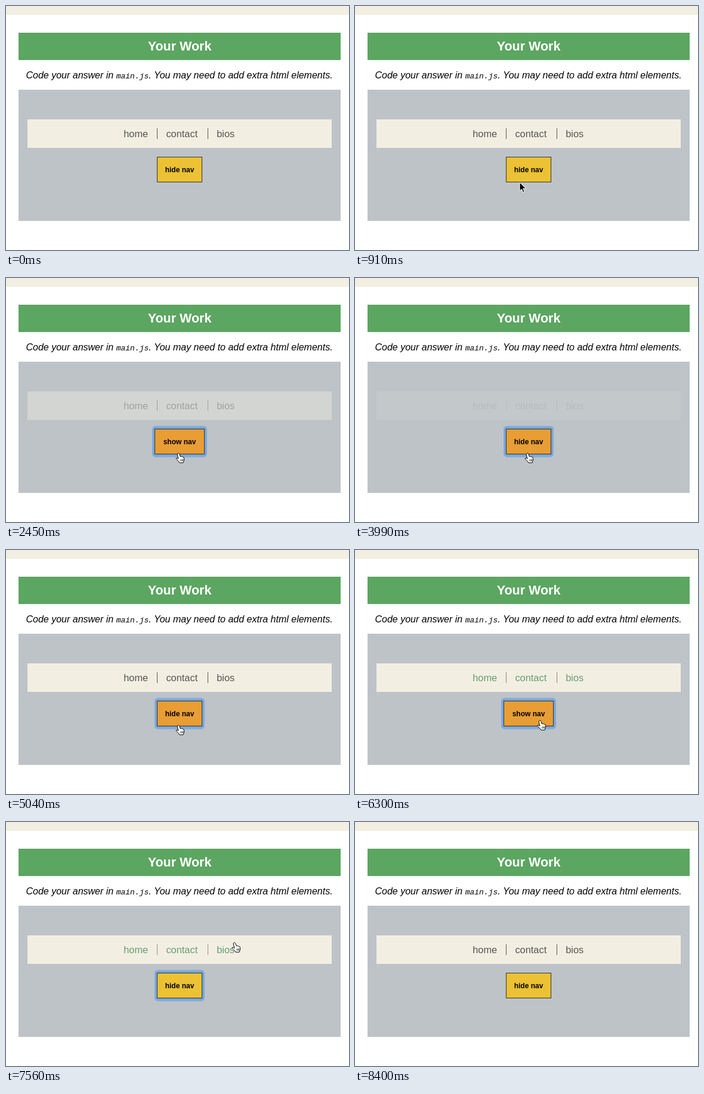
Animation, 575 px wide and 411 px high, one loop 8.47 s. Source, as an HTML page:

```html
<!DOCTYPE html>
<html lang="en">
<head>
<meta charset="utf-8">
<title>Toggle nav</title>
<style>
  html, body { margin: 0; width: 100%; height: 100%; overflow: hidden; background: #fff; }
  svg { display: block; font-family: "Liberation Sans", Arial, sans-serif; }
  .title { font-size: 21.5px; font-weight: bold; fill: #fff; }
  .task { font-size: 16px; font-style: italic; }
  .code { font-size: 13px; font-family: "Liberation Mono", monospace; }
  #links { font-size: 16.4px; }
  #label { font-size: 12px; font-weight: bold; }
</style>
</head>
<body>
<svg width="575" height="411" viewBox="0 0 575 411">
  <rect width="575" height="15" fill="#f2efe2"/>
  <rect x="21" y="45" width="540" height="46" fill="#5ba660"/>
  <text class="title" x="291" y="75" text-anchor="middle">Your Work</text>
  <text class="task" x="33.5" y="122">Code your answer in <tspan class="code">main.js</tspan>. You may need to add extra html elements.</text>
  <rect x="21" y="141" width="540" height="221" fill="#bdc3c7"/>

  <rect id="navBack" x="36" y="191" width="510" height="48" fill="#f2efe2"/>
  <g id="links">
    <text x="197.2" y="221">home</text>
    <text x="268.4" y="221">contact</text>
    <text x="353.2" y="221">bios</text>
  </g>
  <path id="dividers" d="M253.5 206v18M338.5 206v18" stroke="#555"/>

  <g id="ring" fill="none" stroke="#74a7e0">
    <rect id="glow" y="251" height="49" rx="4" stroke-width="4" opacity=".75"/>
    <rect id="halo" y="252.5" height="46" rx="2" stroke-width="3"/>
  </g>
  <rect id="button" y="254.5" height="42" stroke="#333"/>
  <text id="label" x="291" y="280" text-anchor="middle"></text>

  <g id="cursor">
    <path id="arrow" d="M0 0V14.5L3.4 11.4 5.7 16.8 8 15.9 5.8 10.6 10.5 10.4Z" stroke="#fff"/>
    <g id="hand" transform="translate(-5 -1)" fill="#fff" stroke="#000" stroke-linejoin="round">
      <path d="M3.2 3.5Q3 1.5 4.5 1.2 6.2 .8 6.8 2.6L8.3 7Q9.4 6 10.5 7 12 6.2 12.8 7.8 14.5 7.5 14.5 9.5V13L13 17.2H7Q5.5 14.5 1.5 11 .5 9.5 2 9 3.5 8.8 5 10.5Z"/>
      <path d="M8.5 11.5l.8 3.3M10.6 11.2l.5 3.3M12.5 11l.1 3.3" stroke-width=".8"/>
    </g>
  </g>
</svg>
<script>
const LOOP = 8470, STEP = 70, FADE = 1000;
const FIRST_CLICK = 1960, BLUR = 8400, CURSOR_GONE = 7910;

// [time, visible after the click]
const toggles = [[2100, 0], [3990, 1], [6090, 0], [7210, 1]];

// [time, x, y] of the cursor tip
const route = [
  [210, 308, -16], [420, 296, 140], [700, 272, 301],
  [840, 272, 301], [1050, 284, 288], [1190, 288, 295],
  [1890, 288, 295], [1960, 289, 295],
  [5530, 289, 295], [5740, 314, 277], [5880, 310, 287],
  [7280, 310, 287], [7560, 383, 203], [7700, 366, 105], [7840, 346, 14]
];

const $ = id => document.getElementById(id);
const set = (id, attrs) => {
  for (const name in attrs) $(id).setAttribute(name, attrs[name]);
};
const clamp = v => Math.max(0, Math.min(1, v));
const mix = (a, b, k) => a + (b - a) * k;
const mixColor = (a, b, k) => `rgb(${a.map((v, i) => Math.round(mix(v, b[i], k)))})`;
const inside = ([x, y], left, top, right, bottom) =>
  x >= left && x <= right && y >= top && y <= bottom;

// cubic-bezier(.25, .1, .25, 1)
function ease(x) {
  if (x <= 0 || x >= 1) return clamp(x);
  const curve = (s, a, b) => 3 * a * s * (1 - s) ** 2 + 3 * b * s * s * (1 - s) + s ** 3;
  let low = 0, high = 1;
  for (let i = 0; i < 20; i++) {
    const mid = (low + high) / 2;
    if (curve(mid, .25, .25) < x) low = mid; else high = mid;
  }
  return curve(low, .1, 1);
}

function cursorAt(t) {
  const next = route.findIndex(p => p[0] > t);
  if (next === 0) return route[0].slice(1);
  if (next < 0) return route[route.length - 1].slice(1);
  const a = route[next - 1], b = route[next];
  const k = (t - a[0]) / (b[0] - a[0]);
  return [mix(a[1], b[1], k), mix(a[2], b[2], k)];
}

function drawNav(opacity) {
  const faint = Math.max(.1, opacity);
  const solid = opacity > .5;
  set('navBack', { opacity: solid ? 1 : opacity > .3 ? opacity : .1 });
  set('dividers', { opacity: faint });
  set('links', {
    opacity: solid ? 1 : faint,
    fill: solid ? mixColor([106, 156, 112], [85, 85, 85], clamp((opacity - .7) / .28)) : '#555'
  });
}

function drawButton(shown, hovered, focused) {
  const width = shown ? 76 : 84, left = 291 - width / 2;
  set('button', { x: left + .5, width: width - 1, fill: hovered ? '#e89d35' : '#ecc133' });
  set('halo', { x: left - 1.5, width: width + 3 });
  set('glow', { x: left - 2, width: width + 4 });
  set('ring', { visibility: focused ? 'visible' : 'hidden' });
  $('label').textContent = shown ? 'hide nav' : 'show nav';
}

function draw(time) {
  const t = Math.floor(time % LOOP / STEP) * STEP;
  const [start, visible] = toggles.filter(e => e[0] <= t).pop() || [-FADE, 1];
  const progress = ease((t - start) / FADE);
  drawNav(visible ? progress : 1 - progress);

  const tip = cursorAt(t);
  const active = t >= FIRST_CLICK && t < CURSOR_GONE;
  const half = visible ? 38 : 42;
  const onButton = active && inside(tip, 291 - half, 254, 291 + half, 297);
  const onLink = active && inside(tip, 354, 200, 386, 230);
  drawButton(visible, onButton, t >= FIRST_CLICK && t < BLUR);

  const pointing = onButton || onLink;
  set('cursor', {
    transform: `translate(${tip.map(Math.round)})`,
    display: t < CURSOR_GONE ? 'inline' : 'none'
  });
  set('hand', { display: pointing ? 'inline' : 'none' });
  set('arrow', { display: pointing ? 'none' : 'inline' });
}

const origin = performance.now();
function frame() {
  draw(performance.now() - origin);
  requestAnimationFrame(frame);
}
frame();
</script>
</body>
</html>
```
